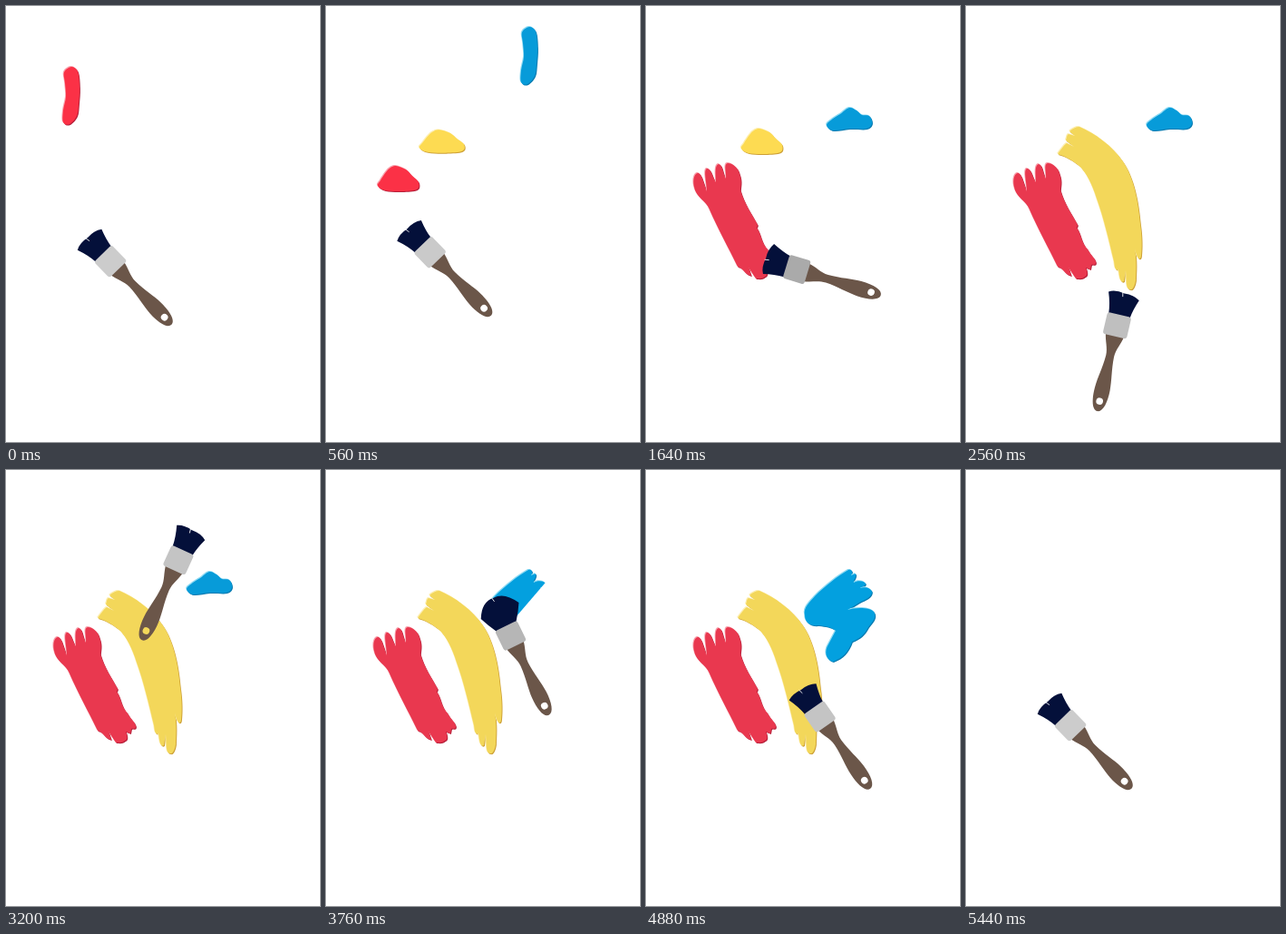
These frames come from a looping animation (346 by 480 pixels, 5.8 s). An HTML page:

```html
<!DOCTYPE html>
<html lang="en">
<head>
<meta charset="utf-8">
<title>Paint strokes</title>
<style>
  html, body { margin: 0; width: 100%; height: 100%; overflow: hidden; background: #fff; }
  svg { display: block; width: 100%; height: 100%; }
</style>
</head>
<body>
<svg id="stage" viewBox="0 0 346 480">
  <g id="paint"></g>
  <g id="brush">
    <path fill="#6b5649" fill-rule="evenodd" d="M10 -10.5 C20 -9 26 -4.5 35 -4.5 C50 -5 60 -8 72 -8.5 C86 -9 97 -6 97 0 C97 6 86 9 72 8.5 C60 8 50 5 35 4.5 C26 4.5 20 9 10 10.5 Z M82 0 a3.8 3.8 0 1 0 7.6 0 a3.8 3.8 0 1 0 -7.6 0 Z"/>
    <path id="bristles" fill="#04103a"/>
    <path id="nick" fill="none" stroke="#fff" stroke-width=".8"/>
    <rect id="ferrule" x="-12" y="-13.5" width="24.5" height="27" rx="3"/>
  </g>
</svg>
<script>
const LOOP = 5800, FRAME = 40;
const $ = id => document.getElementById(id);
const clamp = v => Math.max(0, Math.min(1, v));
const mix = (a, b, k) => a + (b - a) * k;
const smooth = v => { v = clamp(v); return v * v * (3 - 2 * v); };

// Monotone cubic interpolation of one column through rows [time, ...values].
function track(rows, t, col = 1) {
  const last = rows.length - 1;
  if (t <= rows[0][0]) return rows[0][col];
  if (t >= rows[last][0]) return rows[last][col];
  const i = rows.findIndex(r => r[0] > t) - 1;
  const slope = j => (rows[j + 1][col] - rows[j][col]) / (rows[j + 1][0] - rows[j][0]);
  const tangent = j => {
    if (j === 0 || j === last) return 0;
    const a = slope(j - 1), b = slope(j);
    return a * b <= 0 ? 0 : 2 * a * b / (a + b);
  };
  const h = rows[i + 1][0] - rows[i][0], k = (t - rows[i][0]) / h;
  const k2 = k * k, k3 = k2 * k;
  return (2 * k3 - 3 * k2 + 1) * rows[i][col] + (k3 - 2 * k2 + k) * h * tangent(i)
    + (3 * k2 - 2 * k3) * rows[i + 1][col] + (k3 - k2) * h * tangent(i + 1);
}

// Closed Catmull-Rom curve.
function closedCurve(pts) {
  const at = i => pts[(i + pts.length) % pts.length];
  const handle = (i, dir) => [0, 1].map(c => at(i)[c] + dir * (at(i + 1)[c] - at(i - 1)[c]) / 6);
  return "M" + pts[0] + pts.map((p, i) =>
    `C${handle(i, 1)} ${handle(i + 1, -1)} ${at(i + 1)}`).join("") + "Z";
}

const DROP = [[0,-32],[7,-27],[9,-9],[8,9],[6,22],[-2,31],[-9,29],[-9,16],[-6,1],[-7,-14],[-8,-26]];
const MOUND = [[-2,-14],[9,-10],[16,-3],[23,4],[21,12],[4,14],[-14,13],[-22,8],[-19,2],[-13,-7],[-8,-12]];
const CLOUD = [[0,-13],[8,-10],[14,-5],[22,-4],[25,4],[19,10],[0,10],[-18,12],[-25,6],[-18,-1],[-10,-6]];

const paints = [
  {
    drop: "#fb3146", fill: "#e9384f", dark: "#b51f39", light: "#f9a3ae",
    start: 0, from: [72, 99], to: [79, 190], puddle: MOUND, until: 1040,
    outline: "M53 199 C51 190 54 183 58 184 C62 186 63 195 67 204 C67 194 63 181 67 179 C72 178 73 189 77 194 C77 186 75 176 80 174 C85 175 84 184 88 190 C89 184 85 174 90 173 C96 173 102 179 103 185 C106 193 104 198 104 203 C108 217 116 228 123 241 L122 244 C127 251 126 259 134 268 C137 274 142 277 143 282 C143 287 139 283 138 285 L137 290 L132 288 C134 293 134 297 131 298 C128 301 124 300 121 300 L113 288 L116 297 C109 296 107 288 101 287 C91 266 80 247 70 224 C66 214 55 211 53 199 Z",
    spine: "M66 168 L82 205 L133 302", width: 86,
    reveal: [[960, 0], [1120, .27], [1240, .45], [1440, .7], [1640, 1]]
  },
  {
    drop: "#fddb52", fill: "#f3d75a", dark: "#cda037", light: "#fdeeb0",
    start: 240, from: [127, 64], to: [127, 149], puddle: MOUND, until: 1960,
    outline: "M101 163 C104 159 107 154 111 151 L119 155 L110 148 C111 145 111 142 113 141 L120 143 L114 138 C117 135 121 133 125 133 C142 140 161 154 172 170 C185 188 190 216 192 240 C194 254 194 266 193 275 C192 281 188 280 185 262 C189 280 187 294 187 302 C186 308 184 313 181 312 C176 312 177 305 176 291 L174 303 C170 306 169 298 168 290 C164 292 164 287 163 281 C158 260 152 234 144 212 C139 196 133 185 126 177 C118 170 109 165 101 163 Z",
    spine: "M96 139 C150 148 180 210 178 318", width: 84,
    reveal: [[1880, 0], [2000, .14], [2200, .34], [2400, .54], [2520, 1]]
  },
  {
    drop: "#079bd9", fill: "#03a0df", dark: "#087ab0", light: "#8edaf3",
    start: 520, from: [224, 53], to: [224, 125], puddle: CLOUD, until: 3640,
    outline: "M223 110 C227 109 228 112 226 116 L231 114 C232 119 228 121 229 124 C233 121 241 122 242 125 C242 128 236 129 236 130 C241 128 248 130 249 134 C249 140 241 143 235 146 L222 154 C231 151 247 151 251 156 C255 162 249 168 245 173 C241 181 235 186 227 189 C223 200 217 207 206 211 C198 209 196 200 201 192 L209 177 C203 172 197 172 190 171 C181 172 175 168 175 160 C173 151 181 145 186 139 C198 127 211 117 223 110 Z",
    spine: "M232 100 L184 156 Q190 172 210 152 L246 140 Q256 160 236 178 L202 216", width: 46,
    reveal: [[3560, 0], [3800, .36], [4000, .6], [4280, .95], [4360, 1]]
  }
];

// Ferrule centre and handle angle: [time, x, y, degrees].
const POSE = [
  [0, 115, 281, 46], [480, 115, 281, 46], [600, 114, 264, 46], [960, 83, 207, 44],
  [1120, 103, 231, 44], [1240, 118, 250, 38], [1440, 145, 274, 26], [1640, 166, 290, 17],
  [1720, 180, 299, 20], [1860, 132, 168, 42], [2000, 138, 178, 46], [2200, 157, 205, 80],
  [2400, 155, 233, 122], [2520, 168, 330, 108], [2560, 166.5, 351.5, 103], [2640, 166, 351, 103],
  [3200, 190, 99, 114.5], [3440, 222, 148, 88], [3600, 218, 150, 85], [3800, 202, 186, 60],
  [4000, 230, 175, 50], [4200, 222, 196, 40], [4280, 236, 213, 20.5], [4360, 242, 224, 20],
  [4440, 238, 226, 28], [4800, 214, 240, 55], [4960, 150, 300, 55], [5200, -120, 300, 50]
];
// Bristle pressure, sideways drag and ferrule grey: [time, press, drag, grey].
const PRESS = [
  [0, 0, 0, 204], [840, 0, 0, 200], [1120, 1, -3, 180], [1320, .6, -3, 172], [1640, 0, -2, 170],
  [1840, 0, 0, 178], [2000, 1, -3, 180], [2320, .6, -3, 185], [2560, 0, 0, 191],
  [3200, 0, 0, 196], [3360, 0, 0, 190], [3600, .8, 0, 185], [4280, .8, -9, 176],
  [4480, 0, 0, 180], [5200, 0, 0, 204]
];

const svgNS = "http://www.w3.org/2000/svg";
function add(parent, tag, attrs) {
  const el = document.createElementNS(svgNS, tag);
  for (const name in attrs) el.setAttribute(name, attrs[name]);
  return parent.appendChild(el);
}

// Three offset copies give the embossed paint edge.
function embossed(parent, colours, d = "") {
  const offsets = [[.9, 1], [-.9, -.9], [0, 0]];
  return colours.map((fill, i) => add(parent, "path", { fill, d, transform: `translate(${offsets[i]})` }));
}

paints.forEach((p, i) => {
  const mask = add($("stage"), "mask", { id: "reveal" + i, maskUnits: "userSpaceOnUse", x: 0, y: 0, width: 346, height: 480 });
  p.line = add(mask, "path", {
    d: p.spine, fill: "none", stroke: "#fff", "stroke-width": p.width, "stroke-linejoin": "round",
    pathLength: 1, "stroke-dasharray": "1 2"
  });
  p.blob = add($("paint"), "g", {});
  p.layers = embossed(p.blob, [p.dark, p.light, p.drop]);
  p.stroke = add($("paint"), "g", { mask: `url(#reveal${i})` });
  embossed(p.stroke, [p.dark, p.light, p.fill], p.outline);
});

const show = (el, on) => el.setAttribute("display", on ? "inline" : "none");

function drawPaint(p, t) {
  const blobOn = t >= p.start && t < p.until;
  show(p.blob, blobOn);
  if (blobOn) {
    const fall = clamp((t - p.start) / 240), spread = smooth((fall - .55) / .45);
    const bounce = .1 * Math.sin(Math.PI * clamp((t - p.start - 200) / 200));
    const x = mix(p.from[0], p.to[0], fall), y = mix(p.from[1], p.to[1], fall * fall);
    const d = closedCurve(DROP.map((q, i) => [
      x + mix(q[0], p.puddle[i][0], spread) * (1 + bounce),
      y + mix(q[1], p.puddle[i][1], spread) * (1 - bounce)
    ]));
    p.layers.forEach(el => el.setAttribute("d", d));
  }
  const progress = track(p.reveal, t);
  show(p.stroke, progress > 0);
  p.line.setAttribute("stroke-dashoffset", 1 - progress);
}

function drawBrush(t) {
  const [x, y, angle] = [1, 2, 3].map(c => track(POSE, t, c));
  const [press, drag, grey] = [1, 2, 3].map(c => track(PRESS, t, c));
  $("brush").setAttribute("transform", `translate(${x} ${y}) rotate(${angle})`);
  const side = mix(17.5, 24, press), edge = mix(-32, -28, press), crown = mix(-38, -50, press);
  const belly = mix(13, 20, press), top = -side + drag, low = side + drag;
  $("bristles").setAttribute("d", `M-11 -12 Q-20 ${-belly + drag / 2} ${edge} ${top}
    Q${crown + 1} ${top * .6} ${crown + 2} ${drag} Q${crown} ${low * .6} ${edge - 2} ${low}
    Q-22 ${belly + drag / 2} -11 12 Z`);
  $("nick").setAttribute("d", `M${crown + 1} ${2 + drag} l5 -1`);
  $("ferrule").setAttribute("fill", `rgb(${grey},${grey},${grey})`);
}

function draw(now) {
  const t = Math.min(Math.floor((now % LOOP) / FRAME) * FRAME, 5440);
  const resting = t === 5440;
  show($("paint"), t < 5400);
  $("paint").setAttribute("opacity", 1 - clamp((t - 5240) / 160));
  if (!resting) paints.forEach(p => drawPaint(p, t));
  drawBrush(resting ? 0 : t);
}

const began = performance.now();
function tick() {
  draw(performance.now() - began);
  requestAnimationFrame(tick);
}
tick();
</script>
</body>
</html>
```
